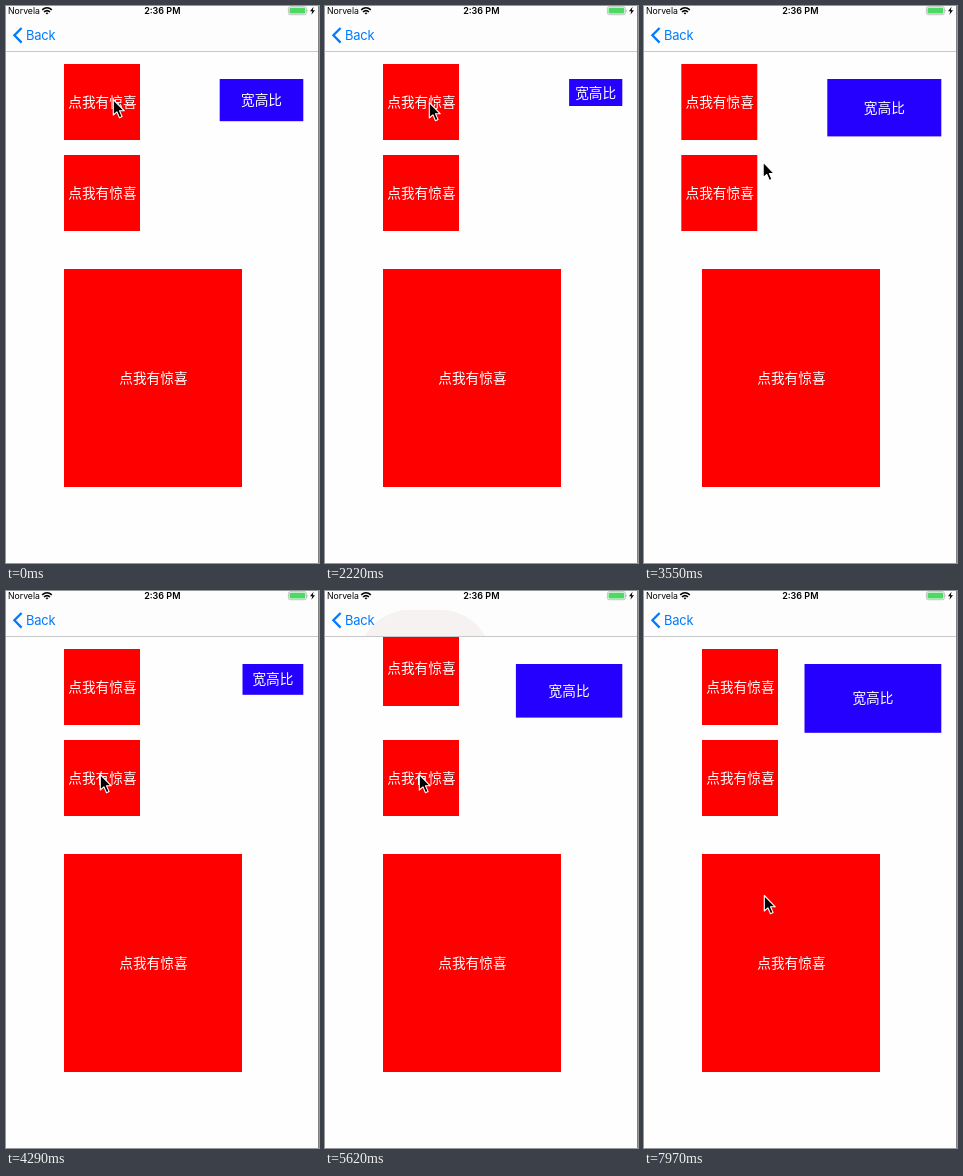
Recreate the animation shown at these times as an HTML page. Size 313x557 px, loop 8000 ms.

```html
<!DOCTYPE html>
<html lang="zh">
<head>
<meta charset="utf-8">
<style>
  html, body { margin: 0; width: 100%; height: 100%; overflow: hidden; background: #fefefe; }
  svg { display: block; width: 100vw; height: 100vh; }
  text { font-family: Inter, "Liberation Sans", sans-serif; }
  .label {
    font: 13.68px "Noto Sans CJK SC", "Noto Sans CJK", "Noto Sans CJK JP", sans-serif;
    font-weight: 300; fill: #fff; text-anchor: middle;
  }
</style>
</head>
<body>
<svg viewBox="0 0 313 557">
  <rect width="313" height="557" fill="#fefefe"/>
  <g id="first">
    <rect x="58" y="58" width="76" height="76" fill="#f00"/>
    <text class="label" x="96.4" y="100.5">点我有惊喜</text>
  </g>
  <g id="second">
    <rect x="58" y="149" width="76" height="76" fill="#f00"/>
    <text class="label" x="96.4" y="192">点我有惊喜</text>
  </g>
  <rect x="58" y="263" width="178" height="218" fill="#f00"/>
  <text class="label" x="147.4" y="377">点我有惊喜</text>
  <rect id="box" y="73" fill="#2600ff"/>
  <text id="boxLabel" class="label">宽高比</text>

  <!-- navigation and status bar -->
  <rect width="313" height="45" fill="#fdfdfd"/>
  <path id="glow" d="M40 45Q52 24 78 19H122Q148 24 160 45Z" fill="#f6f2f1"/>
  <rect y="45" width="313" height="1" fill="#c8c8ca"/>
  <path d="M15.6 22L8.4 29.3L15.6 36.6" fill="none" stroke="#007aff" stroke-width="2.3"/>
  <text x="20" y="34" font-size="12.9" letter-spacing="-.2" fill="#007aff">Back</text>
  <text x="2" y="8" font-size="8.7">Norvela</text>
  <path d="M36.2 3.9Q41 -.4 45.8 3.9M38 6Q41 3.3 44 6" fill="none" stroke="#000" stroke-width="1.6"/>
  <path d="M39.5 7L41 8.6L42.5 7Q41 5.8 39.5 7Z"/>
  <text x="156.3" y="8" font-size="9" font-weight="600" text-anchor="middle">2:36 PM</text>
  <rect x="282.4" y=".7" width="18" height="8" rx="1.9" fill="none" stroke="#aaa" stroke-width=".7"/>
  <rect x="283.5" y="1.8" width="15.8" height="5.8" rx="1" fill="#4cd964"/>
  <path d="M301.3 3.3Q302.7 4.8 301.3 6.3Z" fill="#aaa"/>
  <path d="M307.6 .8L304 5.2H306.3L305.4 8.8L309 4.2H306.7Z"/>

  <rect x="312" width="1" height="557" fill="#808080"/>
  <path id="cursor" d="M0 0V15.5L3.6 12.3L6.2 18.3L8.8 17.1L6.2 11.3H11Z"
        fill="#000" stroke="#fff" stroke-width="1.1" stroke-linejoin="round"/>
</svg>
<script>
const LOOP = 8000, STEP = 147.6;
const SCALE = 0.76, RIGHT = 297.3, TOP = 73;
const LOW = 60, PEAKS = [140, 180, 160, 200], SPEED = 15, FIRST_LOW = 3.4;
const HOME = [107.3, 93.5];
// start step, steps taken, dx, dy
const GLIDES = [[0, 4, -3, 3], [15, 6, 31, 42], [21, 7, -41, 45], [44, 1, 26, 85], [45, 3, 0, 36]];

const $ = id => document.getElementById(id);
const move = (id, x, y) => $(id).setAttribute('transform', `translate(${x} ${y})`);

function set(id, attrs) {
  for (const name in attrs) $(id).setAttribute(name, attrs[name]);
}

// The width climbs to each peak and falls back to LOW at one speed.
function bounce(k) {
  let d = (k - FIRST_LOW) * SPEED;
  if (d < 0) return LOW - d;
  for (const peak of PEAKS) {
    const rise = peak - LOW;
    if (d < 2 * rise) return peak - Math.abs(d - rise);
    d -= 2 * rise;
  }
  return LOW;
}

function ease(f) {
  f = Math.min(1, Math.max(0, f));
  return f * f * (3 - 2 * f);
}

function pointer(k) {
  let [x, y] = HOME;
  for (const [start, steps, dx, dy] of GLIDES) {
    const f = ease((k - start) / steps);
    x += dx * f;
    y += dy * f;
  }
  return [x, y];
}

// a run of half sine waves between two steps
const wave = (k, from, to, halves = 1) =>
  k > from && k < to ? Math.sin((k - from) / (to - from) * halves * Math.PI) : 0;

function draw(t) {
  const k = Math.floor(t / STEP);
  const w = Math.round(bounce(k) / 10) * 10 * SCALE, h = w / 2 + 0.4;
  set('box', { x: RIGHT - w, width: w, height: h });
  set('boxLabel', { x: RIGHT - w / 2, y: TOP + h / 2 + 5 });

  const dx = 20.7 * wave(k, 19.5, 28.5, 3);
  const lift = wave(k, 36, 40);
  move('first', dx, -19 * lift);
  move('second', dx, 23 * wave(k, 31, 35));
  set('glow', { opacity: lift });
  move('cursor', ...pointer(k));
}

const start = performance.now();
function tick() {
  draw((performance.now() - start) % LOOP);
  requestAnimationFrame(tick);
}
tick();
</script>
</body>
</html>
```
